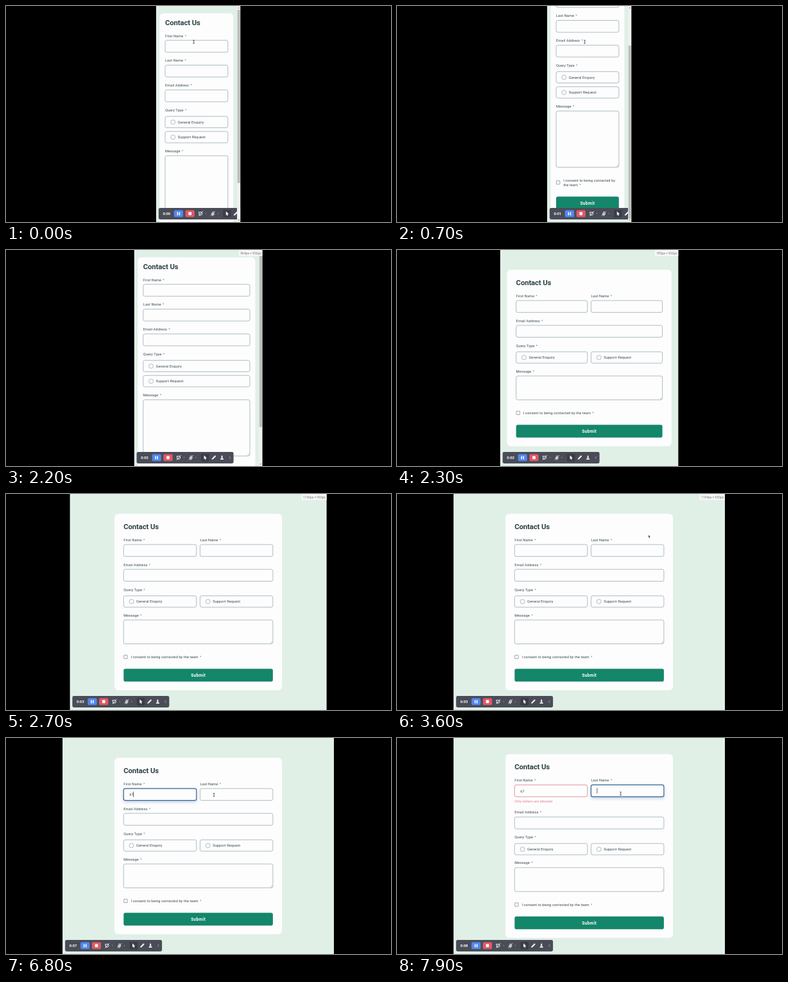
Write an HTML page that moves like this. It is 600 px wide and 338 px high and loops after 8 s.

```html
<!DOCTYPE html>
<html lang="en">
<head>
<meta charset="utf-8">
<title>Responsive contact form</title>
<style>
  html, body { margin: 0; width: 100%; height: 100%; overflow: hidden; background: #000; }
  #stage { display: block; width: 600px; height: 338px; }
  text { font: 5.67px Roboto, sans-serif; letter-spacing: .07px; fill: #33494d; white-space: pre; }
  .title { font-size: 11.34px; font-weight: 700; letter-spacing: -.12px; fill: #2a4144; }
  .button { font-size: 6.5px; font-weight: 700; letter-spacing: .3px; fill: #fff; text-anchor: middle; }
  .error { letter-spacing: 0; fill: #e2808d; }
  .clock { font-size: 5.8px; font-weight: 700; letter-spacing: 0; fill: #fff; text-anchor: middle; }
  .size { font-size: 5px; letter-spacing: 0; fill: #777; text-anchor: end; }
  .star { fill: #4c9583; }
  .line { fill: none; stroke: #87a3a6; stroke-width: .7; }
  .bad { stroke: #dc8a92; stroke-width: .9; }
  .focus { fill: #fefdfe; stroke: #2c6a94; stroke-width: 1.2; filter: drop-shadow(0 2.5px 2.5px rgba(50, 80, 150, .28)); }
  .caret { fill: #33405a; }
  .icon { fill: none; stroke: #f2f2f5; stroke-width: 1; stroke-linecap: round; stroke-linejoin: round; }
  .solid { fill: #f2f2f5; }
</style>
</head>
<body>
<svg id="stage" viewBox="0 0 600 338"></svg>
<script>
const LOOP = 8000, TICK = 100, H = 338, MID = 299.6;
const PX = 0.3543; // stage pixels per page pixel

// [start, page width]
const WIDTHS = [[0, 131.6], [2200, 200], [2300, 278], [2400, 352], [2500, 400.4], [2900, 413], [3000, 423]];

// [start, x, y, shape]
const POINTER = [
  [0, 292.5, 56, 'beam'], [1700],
  [3300, 425, 49, 'arrow'], [3400, 417, 53, 'arrow'], [3500, 405, 59, 'arrow'],
  [3600, 392, 64, 'arrow'], [3700, 383, 67, 'arrow'],
  [3900, 368, 70, 'arrow'], [4000, 351, 71, 'arrow'], [4100, 338, 71, 'arrow'], [4200, 331, 71, 'arrow'],
  [4700, 276.5, 86, 'beam'], [6700, 300, 88, 'beam'], [6800, 324, 89, 'beam'],
  [6900, 340, 88, 'beam'], [7000, 348.5, 87, 'beam']
];

const at = (steps, t) => steps.findLast(s => s[0] <= t);
const within = (t, a, b) => t >= a && t < b;
const ease = p => { p = Math.min(1, Math.max(0, p)); return p * p * (3 - 2 * p); };

const rect = (x, y, w, h, r, attrs) => `<rect x="${x}" y="${y}" width="${w}" height="${h}" rx="${r}" ${attrs}/>`;
const text = (x, y, str, cls = '') => `<text x="${x}" y="${y}" class="${cls}">${str}</text>`;
const path = (d, cls) => `<path d="${d}" class="${cls}"/>`;
const fill = c => `fill="${c}"`;
const star = '<tspan class="star" dx="2.3">*</tspan>';

function stateAt(t) {
  return {
    width: at(WIDTHS, t)[1],
    scroll: 70 * (ease((t - 200) / 500) - ease((t - 800) / 400)),
    seconds: Math.floor((t + 300) / 1000),
    sizeTag: within(t, 2200, 4000),
    focus: t < 4700 ? '' : t < 7800 ? 'first' : 'last',
    caret: within(t, 4700, 5800) || within(t, 6300, 7200) || t >= 7800,
    first: t < 6500 ? '' : t < 6800 ? 'q' : 'q1',
    error: t >= 7800,
    pointer: at(POINTER, t)
  };
}

function field(x, y, w, label, value, { focus, caret, bad } = {}) {
  const top = y + 7.2;
  const cls = focus ? 'line focus' : bad ? 'line bad' : 'line';
  const caretX = x + 9 + (value ? value.length * 3 : 0);
  return text(x, y + 2, label + star) +
    rect(x, top, w, 18.6, 2.6, `class="${cls}"`) +
    (value ? text(x + 9, top + 11.3, value) : '') +
    (focus && caret ? rect(caretX, top + 4.8, .8, 8.6, 0, 'class="caret"') : '');
}

function option(x, y, w, label) {
  return rect(x, y, w, 17.8, 2.6, 'class="line"') +
    `<circle cx="${x + 12.3}" cy="${y + 9}" r="3.5" class="line"/>` +
    text(x + 19.8, y + 11, label);
}

function form(s) {
  const mobile = s.width < 212;
  const pageW = s.width - (mobile ? 5.4 : 0);
  const cardW = Math.min(261, pageW - (mobile ? 11.4 : 21.6));
  const cardX = (pageW - cardW) / 2;
  const pad = mobile ? 8.5 : 14.2;
  const x = cardX + pad, w = cardW - 2 * pad;
  const half = mobile ? w : (w - 5.67) / 2;
  const x2 = mobile ? x : x + half + 5.67;
  const wrap = w < 118;
  const extra = s.error ? 11.5 : 0;
  const cardH = mobile ? (wrap ? 385 : 378) : 276 + extra;
  const top = mobile ? 11.5 - s.scroll : (H - cardH) / 2;
  const row = 38.8;

  let y = top + (mobile ? 14 : 19.5);
  let out = rect(cardX, top, cardW, cardH, 5.8, fill('#fefdfe')) + text(x, y + 4, 'Contact Us', 'title');

  y += mobile ? 21 : 21.4;
  const lastY = mobile ? y + row : y;
  const first = field(x, y, half, 'First Name', s.first, { focus: s.focus === 'first', caret: s.caret, bad: s.error });
  const last = field(x2, lastY, half, 'Last Name', '', { focus: s.focus === 'last', caret: s.caret });
  out += first + last;
  if (s.error) out += text(x, y + 35.2, 'Only letters are allowed.', 'error');

  y = lastY + row + extra;
  out += field(x, y, w, 'Email Address', '');

  y += row;
  out += text(x, y + 2, 'Query Type' + star) + option(x, y + 9.8, half, 'General Enquiry');
  out += option(x2, y + 9.8 + (mobile ? 23.6 : 0), half, 'Support Request');

  y += mobile ? 64 : 40.2;
  const areaH = mobile ? 88 : 37.4;
  out += text(x, y + 2, 'Message' + star) + rect(x, y + 7.4, w, areaH, 2.6, 'class="line"');

  y += 7.4 + areaH;
  const right = x + w;
  out += path(`M${right - 3.6} ${y - 1}l2.6 -2.6M${right - 2} ${y - 1}l1 -1`, 'line');

  y += 20.6;
  const say = wrap ? ['I consent to being contacted by', 'the team'] : ['I consent to being contacted by the team'];
  out += rect(x + .4, y - 2.9 + (wrap ? 3.5 : 0), 5.4, 5.4, .5, 'fill="#fff" stroke="#6d8285" stroke-width=".7"');
  say.forEach((line, i) => {
    out += text(x + 11.2, y + 2 + i * 7, line + (i === say.length - 1 ? star : ''));
  });

  y += 18.4 + (wrap ? 7 : 0);
  out += rect(x, y, w, 20, 2.8, fill('#14866a')) + text(x + w / 2, y + 12.3, 'Submit', 'button');
  return out;
}

function toolbar(seconds) {
  const cam = 'M-2.6 -2.2h3.6a2.4 2.4 0 0 1 0 4.4h-2.6zM-3 3.4L3 -3.4';
  const mic = 'M-1 -1.8a1 1 0 0 1 2 0v1.6a1 1 0 0 1 -2 0zM-2.2 0a2.2 2.2 0 0 0 4.4 0M0 2.2v1.2M-3 3.2L3 -3.2';
  const icons = [
    [65.6, cam, 'icon'], [84.6, mic, 'icon'],
    [74, 'M-.7 -.5h1.4l-.7 1.2z', 'solid'], [92.4, 'M-.7 -.5h1.4l-.7 1.2z', 'solid'],
    [106.7, 'M-1.8 -3.6L2.6 .7L.6 1L1.6 3.2L.5 3.7L-.5 1.5L-1.8 2.7z', 'solid'],
    [120, 'M-3.1 3.2l.6 -2.2L1.5 -3a.9 .9 0 0 1 1.6 1.5L-.9 2.6z', 'solid'],
    [133, 'M-2.9 3.2h5.8l-1.2 -2h-3.4zM-1.5 .6L-.6 -3.4h1.2L1.5 .6z', 'solid'],
    [145.2, 'M.7 -1.8l-1.6 1.8l1.6 1.8', 'icon" stroke-opacity=".45']
  ];
  return `<g transform="translate(4 316)">` +
    rect(0, 0, 151, 18, 2.4, fill('#4a4d57')) +
    text(12.5, 10.8, '0:0' + seconds, 'clock') +
    rect(24, 3.6, 14.2, 10.6, 2, fill('#5187f2')) +
    rect(28.8, 6.4, 1.6, 5, .3, fill('#fff')) + rect(31.8, 6.4, 1.6, 5, .3, fill('#fff')) +
    rect(41.8, 3.6, 14.2, 10.6, 2, fill('#e25866')) +
    rect(46.6, 6.6, 4.6, 4.6, .7, fill('#fff')) +
    rect(100.4, 3, 12.4, 12, 1.5, fill('#3a3c46')) +
    icons.map(([x, d, cls]) => `<g transform="translate(${x} 8.9)">${path(d, cls)}</g>`).join('') +
    '</g>';
}

function scrollbar(w, scroll) {
  const c = w - 2.7;
  return rect(w - 5.4, 0, 5.4, H, 0, fill('#f1f1f1')) +
    rect(w - 4.8, 6 + scroll * .8, 4.2, 271, 0, fill('#bdbdbd')) +
    `<path d="M${c - 1.3} 3.6h2.6l-1.3 -1.5zM${c - 1.3} 334.4h2.6l-1.3 1.5z" fill="#666"/>`;
}

function sizeTag(w) {
  const label = `${Math.round(w / PX)}px × 953px`;
  const tagW = label.length * 2.82;
  return rect(w - tagW, 0, tagW, 9.3, 0, fill('#f6f8f7')) + text(w - 1.8, 6.5, label, 'size');
}

function pointer([, x, y, shape]) {
  if (!shape) return '';
  const d = shape === 'beam'
    ? 'M-1.3 -2.4h2.4M-1.3 2.4h2.4M.2 -2.4v4.8'
    : 'M0 0l3 3.2l-1.5 .1l.8 1.7l-.7 .3l-.8 -1.7l-.8 1z';
  const style = shape === 'beam' ? 'fill="none" stroke="#333" stroke-width=".75"' : 'fill="#222" stroke="#fff" stroke-width=".3"';
  return `<path d="${d}" transform="translate(${x} ${y})" ${style}/>`;
}

function draw(s) {
  const w = s.width;
  return `<svg x="${MID - w / 2}" y="0" width="${w}" height="${H}">` +
    rect(0, 0, w, H, 0, fill('#e0f0e7')) +
    form(s) + toolbar(s.seconds) +
    (w < 212 ? scrollbar(w, s.scroll) : '') +
    (s.sizeTag ? sizeTag(w) : '') +
    '</svg>' + pointer(s.pointer);
}

const stage = document.getElementById('stage');
const start = performance.now();
let shown = -1;

function frame() {
  const t = Math.floor(((performance.now() - start) % LOOP) / TICK) * TICK;
  if (t !== shown) {
    stage.innerHTML = draw(stateAt(t));
    shown = t;
  }
  requestAnimationFrame(frame);
}
frame();
</script>
</body>
</html>
```
